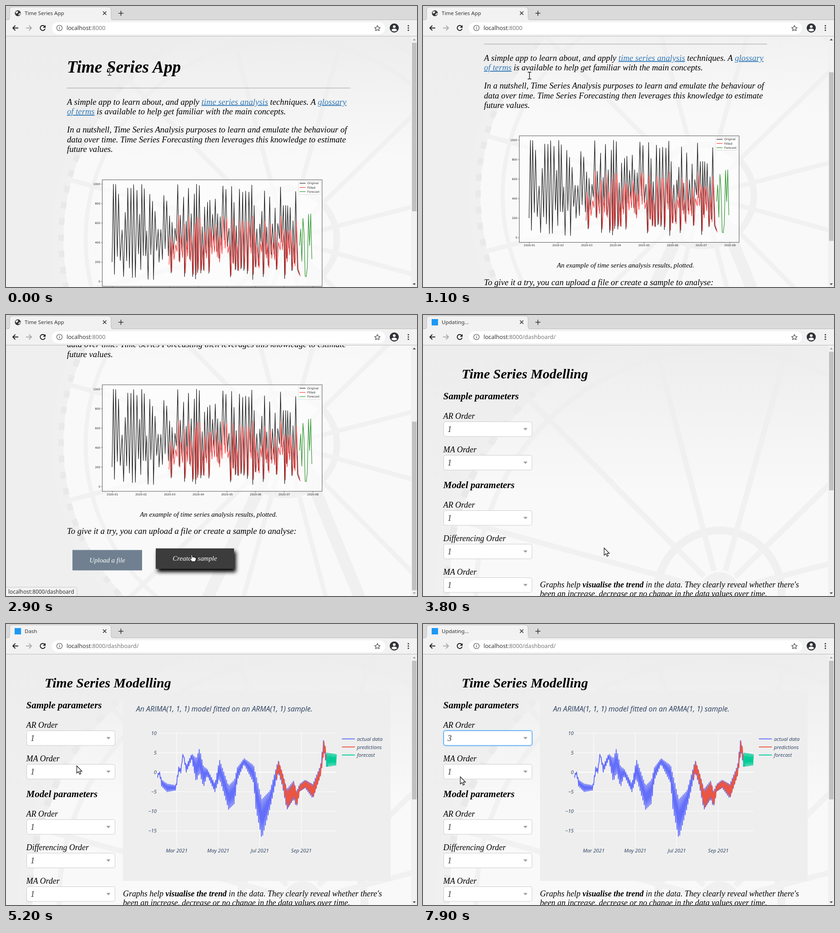
An HTML page that plays this animation: 903x620 px, repeating every 8000 ms.

```html
<!DOCTYPE html>
<html lang="en">
<head>
<meta charset="utf-8">
<title>Time Series App</title>
<style>
html, body { margin: 0; height: 100%; overflow: hidden; }
svg { display: block; width: 100vw; height: 100vh; font: italic 18.67px "Liberation Serif", serif; }
.ui { font-family: "Noto Sans", sans-serif; font-style: normal; fill: #333; }
.mpl { font-family: "DejaVu Sans", sans-serif; font-style: normal; fill: #222; }
.plotly { font-family: "Open Sans", sans-serif; fill: #2a3f5f; }
.b { font-weight: bold; }
.link { fill: #337ab7; text-decoration: underline; }
.line { fill: none; stroke-linejoin: round; }
</style>
</head>
<body>
<svg id="stage" viewBox="0 0 903 620"></svg>
<script>
const text = (x, y, size, str, attrs = '') => `<text x="${x}" y="${y}" font-size="${size}" ${attrs}>${str}</text>`;
const rect = (x, y, w, h, fill, attrs = '') => `<rect x="${x}" y="${y}" width="${w}" height="${h}" fill="${fill}" ${attrs}/>`;
const path = (d, stroke, width = 1, attrs = '') => `<path class="line" d="${d}" stroke="${stroke}" stroke-width="${width}" ${attrs}/>`;
const ring = (x, y, r, stroke, width, attrs = '') => `<circle cx="${x}" cy="${y}" r="${r}" fill="none" stroke="${stroke}" stroke-width="${width}" ${attrs}/>`;
const group = (id, body) => `<g id="${id}">${body}</g>`;
const poly = (points, stroke, width) => path('M' + points.map(p => p.map(n => n.toFixed(1)).join()).join('L'), stroke, width);
const clamp = v => Math.max(0, Math.min(1, v));

function seeded(seed) {
  return () => (seed = seed * 16807 % 2147483647) / 2147483647;
}

// Interpolates rows of [position, ...values]
function track(rows, at) {
  const next = rows.findIndex(r => r[0] > at);
  if (next === 0) return rows[0].slice(1);
  if (next < 0) return rows[rows.length - 1].slice(1);
  const a = rows[next - 1], b = rows[next], k = (at - a[0]) / (b[0] - a[0]);
  return a.slice(1).map((v, j) => v + (b[j + 1] - v) * k);
}

// Pale ferris wheel behind both pages
function backdrop() {
  const hub = [615, 515];
  let spokes = '';
  for (let i = 0; i < 12; i++) {
    const a = .27 + i * Math.PI / 6, c = Math.cos(a), s = Math.sin(a);
    spokes += `M${hub[0] + 40 * c},${hub[1] + 40 * s}L${hub[0] + 500 * c},${hub[1] + 500 * s}`;
  }
  return rect(-200, 67, 1300, 800, '#efefef') +
    '<circle cx="615" cy="515" r="510" fill="#f9f9f9"/>' +
    ring(...hub, 502, '#f0f0f0', 26) +
    ring(...hub, 494, '#e9e9e9', 12, 'stroke-dasharray="15 21"') +
    ring(...hub, 440, '#f1f1f1', 9) + ring(...hub, 112, '#f0f0f0', 14) +
    path(spokes, '#f1f1f1', 10) +
    path('M600 520L440 860M640 520L780 860', '#f0f0f0', 26) +
    '<circle cx="615" cy="515" r="36" fill="#f0f0f0"/>' +
    rect(-200, 67, 1300, 270, 'url(#haze)');
}

function sampleChart() {
  const random = seeded(77), y = v => 608 - .215 * v;
  const actual = [[233, 200]];
  for (let x = 236, high = true; x < 644; x += 2 + random() * 2, high = !high)
    actual.push([x, high ? 1000 - 480 * random() ** 1.3 : 20 + 420 * random() ** 1.2]);
  actual.push([645, 70]);
  const fitted = actual.filter(p => p[0] > 356).map(([x, v], i, all) =>
    [x + 1.5, .66 * v + .06 * (i ? all[i - 1][1] : 0)]);
  const forecast = [370, 540, 210, 650, 500, 55, 50, 150, 690, 370, 695, 230].map((v, i) => [645 + i * 2.45, v]);
  let out = rect(211.5, 383.5, 483, 235, '#fff', 'fill-opacity=".6" stroke="#555"');
  [[actual, '#222'], [fitted, '#f33'], [forecast, '#2e962e']].forEach(([data, color]) =>
    out += poly(data.map(([x, v]) => [x, y(v)]), color, 1.2));
  for (let v = 0; v <= 1000; v += 200)
    out += path(`M209 ${y(v)}h3`, '#444', .8) + text(207, y(v) + 2.3, 6, v, 'text-anchor="end"');
  for (let month = 1; month <= 8; month++) {
    const x = 171 + month * 62.9;
    out += path(`M${x} 618v3`, '#444', .8) + text(x, 627, 6, `2020-0${month}`, 'text-anchor="middle"');
  }
  out += rect(642.5, 386.5, 49, 29, '#fff', 'stroke="#ddd" rx="1"');
  [['Original', '#222'], ['Fitted', '#f33'], ['Forecast', '#2e962e']].forEach(([name, color], i) =>
    out += path(`M645 ${391 + i * 9.3}h13`, color, 1.2) + text(662, 393.3 + i * 9.3, 6.3, name));
  return `<g class="mpl">${out}</g>`;
}

const button = (id, x, w, label) => group(id,
  rect(x, 748, w, 45, '#708090') + text(x + w / 2, 775, 14.93, label, 'fill="#fff" text-anchor="middle"'));

const homePage = () => backdrop() +
  text(134, 147, 37.33, 'Time Series App', 'class="b"') + path('M134 181h622', '#999') +
  text(134, 217.5, 18.67, 'A simple app to learn about, and apply <tspan class="link">time series analysis</tspan> techniques. A <tspan class="link">glossary</tspan>') +
  text(134, 239, 18.67, '<tspan class="link">of terms</tspan> is available to help get familiar with the main concepts.') +
  ['In a nutshell, Time Series Analysis purposes to learn and emulate the behaviour of',
    'data over time. Time Series Forecasting then leverages this knowledge to estimate',
    'future values.'].map((s, i) => text(134, 279 + i * 21.5, 18.67, s)).join('') +
  sampleChart() +
  text(445, 674, 14.93, 'An example of time series analysis results, plotted.', 'text-anchor="middle"') +
  text(134, 712.5, 18.67, 'To give it a try, you can upload a file or create a sample to analyse:') +
  button('upload', 146, 153, 'Upload a file') + button('create', 329, 172, 'Create a sample');

const field = (label, y, id = 'f' + y) => text(44.5, y - 6.5, 17.92, label) +
  rect(45.5, y + .5, 194, 32.5, '#fff', `rx="4" stroke="#ccc" id="${id}Box"`) +
  text(54, y + 22.7, 17.92, 1, `fill="#333" id="${id}Value"`) +
  `<path d="M220.5 ${y + 14.5}h9l-4.5 5z" fill="#999" id="${id}Caret"/>`;

const signed = v => String(v).replace('-', '−');

function emptyPlot() {
  let out = rect(257, 147, 588, 420, '#fefefe');
  for (let v = -1; v <= 4; v++) {
    const y = 441.5 - v * 50.3;
    if (v > 0 && v < 4) out += path(`M332 ${y}h438`, '#eee');
    out += text(331, y + 4, 11.2, signed(v), 'text-anchor="end"');
  }
  for (let v = 0; v <= 6; v += 2) {
    const x = 394.5 + v * 62.7;
    if (v && v < 6) out += path(`M${x} 240v251`, '#eee');
    out += text(x, 504, 11.2, v, 'text-anchor="middle"');
  }
  return `<g class="plotly" style="fill:#444">${out}${path('M332 441.5h438.5M394.5 240v251', '#555', 1.1)}</g>`;
}

const modebar = () => rect(647, 158, 12, 9, '#f3f3f3', 'rx="1"') + ring(681, 161, 4.5, '#ccc', 2) +
  path('M684 165l4 4M679 161h4', '#ccc', 2) + path('M699 162h13M705.5 156v13', '#eee', 1.5) +
  rect(729, 157, 11, 11, '#f1f1f1') + rect(751, 157, 11, 11, '#f1f1f1') +
  path('M775 157l11 11M786 157l-11 11M796 163l6-6l6 6M799 162v6h6v-6', '#f0f0f0', 1.5) + rect(825, 155, 14, 14, '#ddd');

function modelPlot() {
  const y = v => 327 - 8.62 * v;
  // x, level, swing of the alternating days
  const shape = [[333, -1, .4], [337, 0, .3], [342, -2.8, .8], [354, -4, 1], [373, -4, .6], [380, 1, .7],
    [384, .2, .4], [389, 4.8, .2], [396, .8, .8], [408, 4, .7], [418, .5, 3], [425, 3, 3], [434, -1.2, 2.6],
    [442, 0, .8], [459, -4, 1], [469, .8, 2.4], [489, -6.5, 3], [502, -5, 3], [508, -.5, 1.6], [523, 2.8, .7],
    [544, -.5, 2.2], [549, -5, 4.3], [562, -12, 5], [580, -7, 2.2], [598, 1.5, 1.5], [607, -1.8, 1.6],
    [617, -7, 2.6], [632, -4.5, 2.3], [638, -7, 2], [645, -4, .9], [657, -3, 1], [674, -4.9, 1.8],
    [691, .5, 1.2], [698, 7, 1.6], [705, 2.4, 1]];
  const wave = (from, to, shift, scale) => {
    const points = [];
    for (let i = Math.round((from - 333) / 1.5); 333 + i * 1.5 <= to; i++) {
      const x = 333 + i * 1.5, [level, swing] = track(shape, x);
      points.push([x + shift, y(level + swing * scale * (i % 2 ? 1 : -1))]);
    }
    return points;
  };
  const forecast = Array.from({ length: 16 }, (_, i) => [704 + i * 1.45, y(3.2 + (i % 2 ? 1 : -1) * (1.75 - i * .025))]);
  let out = rect(257, 147, 588, 420, '#eee');
  for (let v = 10; v >= -15; v -= 5)
    out += path(`M333 ${y(v)}h393`, '#fff', v ? 1 : 2) + text(331, y(v) + 4, 11.2, signed(v), 'text-anchor="end"');
  ['Mar', 'May', 'Jul', 'Sep'].forEach((month, i) => {
    const x = 375 + i * 91.3;
    out += path(`M${x} 240v251`, '#fff') + text(x, 504, 11.2, month + ' 2021', 'text-anchor="middle"');
  });
  out += poly(wave(333, 705, 0, 1), '#636efa', 1.9) + poly(wave(593, 703, 1, .85), '#ef553b', 1.9) + poly(forecast, '#00cc96', 1.9);
  [['actual data', '#636efa'], ['predictions', '#ef553b'], ['forecast', '#00cc96']].forEach(([name, color], i) =>
    out += path(`M738 ${253.5 + i * 17.8}h28.5`, color, 1.9) + text(771, 257.7 + i * 17.8, 11.2, name));
  return `<g class="plotly">${out}${text(286, 193, 15.87, 'An ARIMA(1, 1, 1) model fitted on an ARMA(1, 1) sample.')}</g>`;
}

const dashboard = () => group('plots', group('empty', emptyPlot()) + group('modebar', modebar()) + group('model', modelPlot())) +
  text(85, 139.5, 29.87, 'Time Series Modelling', 'class="b"') +
  text(44.5, 186, 20.97, 'Sample parameters', 'class="b"') + field('AR Order', 235, 'order') + field('MA Order', 309) +
  text(44.5, 382, 20.97, 'Model parameters', 'class="b"') + field('AR Order', 431) +
  field('Differencing Order', 505) + field('MA Order', 579) +
  text(257, 600.5, 17.92, 'Graphs help <tspan class="b">visualise the trend</tspan> in the data. They clearly reveal whether there\'s') +
  text(257, 621, 17.92, 'been an increase, decrease or no change in the data values over time.') +
  group('menu', rect(45.5, 268.5, 195, 132, '#fff', 'stroke="#ccc" rx="2"') + rect(46, 269, 194, 32.5, '#e5f2ff', 'id="option"') +
    [1, 2, 3, 4].map((n, i) => text(53.5, 291 + i * 32.7, 17.92, n, i ? '' : 'class="b"')).join(''));

const browser = () => rect(0, 0, 903, 67, '#dadada') +
  '<path d="M0 31h4q4 0 4-4V9q0-7 7-7H224q7 0 7 7v18q0 4 4 4H903v35H0z" fill="#f2f2f2"/>' +
  path('M0 30.5h4q4 0 4-4V9q0-7 7-7H224q7 0 7 7v17.5q0 4 4 4H903M0 66.5H903', '#bbb') +
  rect(101, 36, 732, 26, '#fff', 'rx="13"') +
  group('globe', '<circle cx="26" cy="16" r="6.5" fill="#333"/><path d="M21 13l4-2 2 2-2 3-3 1zM27 18l4-3 1 2-4 4z" fill="#eee"/>') +
  rect(19, 9, 14, 14, '#1c98f5', 'id="favicon"') + path('M26 10a6 6 0 1 1-6 6', '#4285f4', 2, 'id="spinner"') +
  text(41, 20.3, 11.5, '', 'class="ui" id="title"') +
  path('M213 12l7.5 7.5M220.5 12l-7.5 7.5M247 16h11M252.5 10.5v11', '#333', 1.6) +
  path('M27 48.5H15M20.5 43l-5.5 5.5l5.5 5.5', '#222', 1.8) + path('M44 48.5h12M50.5 43l5.5 5.5l-5.5 5.5', '#aaa', 1.8) +
  path('M85 45a5.5 5.5 0 1 0 1 5', '#222', 1.9) + '<path d="M87 42v6h-6z" fill="#222"/>' +
  ring(117.5, 48.5, 6, '#555', 1.2) + path('M117.5 47.5v4M117.5 45v1.3', '#555', 1.3) +
  text(133, 53, 12.6, 'localhost<tspan fill="#777">:8000<tspan id="route"></tspan></tspan>', 'class="ui"') +
  path('M816 43l2 4 4 .5-3 3 1 4-4-2-4 2 1-4-3-3 4-.5z', '#444', 1.2) +
  '<circle cx="853" cy="48.5" r="10" fill="#303236"/><circle cx="853" cy="45.5" r="3" fill="#fff"/><path d="M847 54q0-4 6-4t6 4q-6 4-12 0z" fill="#fff"/>' +
  [43.5, 48.5, 53.5].map(y => `<circle cx="884" cy="${y}" r="1.6" fill="#333"/>`).join('');

const scrollbar = () => rect(890, 67, 13, 553, '#f1f1f1') + rect(892, 81, 10, 372, '#c1c1c1', 'id="thumb"') +
  '<path id="up" d="M893.5 76h7l-3.5-4z"/><path id="down" d="M893.5 612h7l-3.5 4z"/>';

function pointers() {
  const beam = 'M-4-7h3l1 1 1-1h3M0-6V7M-4 8h3l1-1 1 1h3';
  return group('arrow', '<path d="M0 0V16l3.7-3.3 2.5 5.8 2.7-1.1-2.5-5.6h5z" fill="#fff" stroke="#111" stroke-width="1.2"/>') +
    group('beam', path(beam, '#fff', 3) + path(beam, '#111', 1.4)) +
    group('hand', '<path d="M-2 1.5q1-2 2.5 0V6q4-.5 8 2v4l-2 4H-.5l-5-6q1-2 3.5 0z" fill="#fff" stroke="#111" stroke-width="1.1"/>');
}

document.getElementById('stage').innerHTML =
  '<defs><linearGradient id="haze" x2="0" y2="1"><stop stop-color="#ededed"/><stop offset="1" stop-color="#ededed" stop-opacity="0"/></linearGradient></defs>' +
  group('home', homePage()) +
  group('dash', `<g transform="translate(-95.7 -14.4) scale(1.215)">${backdrop()}</g>` + group('content', dashboard())) +
  group('scrollbar', scrollbar()) + browser() +
  group('status', '<path d="M-1 621V600.5H151q5 0 5 5V621z" fill="#f2f2f2" stroke="#c8c8c8"/>' + text(5, 615, 11.85, 'localhost:8000/dashboard', 'class="ui"')) +
  group('cursor', pointers());

const scrollKeys = [[800, 0], [900, 18], [1100, 97], [1200, 107], [1300, 107], [1600, 175.5], [1900, 229.5]];
const cursorKeys = [[300, 227.5, 145], [500, 234, 153], [1300, 234, 153], [1600, 242, 178], [1800, 258, 215],
  [2200, 400, 535], [2400, 409, 528], [3300, 409, 528], [3700, 398, 514], [4600, 398, 514], [5000, 230, 370],
  [5400, 81, 256], [6500, 81, 256], [7000, 220, 362], [7700, 220, 362], [7900, 82, 337]];

const el = id => document.getElementById(id);
const set = (id, name, value) => el(id).setAttribute(name, value);
const show = (id, on) => el(id).style.display = on ? '' : 'none';

function render(t) {
  const home = t < 3300, ready = t >= 3800, open = t >= 6500 && t < 7400, chosen = t >= 7400;
  const [scroll] = track(scrollKeys, t), [x, y] = track(cursorKeys, t);

  show('home', home);
  show('dash', !home);
  show('content', ready);
  set('home', 'transform', `translate(0 ${-scroll})`);

  const hover = clamp((t - 2200) / 200), mix = (a, b) => Math.round(a + (b - a) * hover);
  const face = el('create').firstChild;
  set('create', 'transform', `translate(0 ${-3.5 * hover})`);
  face.setAttribute('fill', `rgb(${mix(112, 60)},${mix(128, 60)},${mix(144, 60)})`);
  face.style.filter = hover ? `drop-shadow(4px 7px 4px rgba(0,0,0,${hover}))` : '';
  show('status', t >= 2300 && home);

  show('plots', t >= 4000);
  show('empty', t < 4800);
  show('modebar', t >= 4600 && t < 4800);
  show('model', t >= 4800);
  show('menu', open);
  set('option', 'y', 269 + 32.7 * Math.max(0, Math.min(3, Math.floor((y - 268) / 32.7))));
  set('orderCaret', 'd', open ? 'M220.5 255.5h9l-4.5-5z' : 'M220.5 249.5h9l-4.5 5z');
  set('orderBox', 'stroke', chosen ? '#1f8cff' : '#ccc');
  el('orderBox').style.filter = chosen ? 'drop-shadow(0 0 1.5px rgba(0,126,255,.5))' : '';
  el('orderValue').textContent = chosen ? 3 : 1;

  show('globe', t < 3000);
  show('favicon', ready);
  show('spinner', t >= 3000 && !ready);
  set('spinner', 'transform', `rotate(${t * .6} 26 16)`);
  el('title').textContent = home ? 'Time Series App' : (ready && t < 5000) || t >= 7600 ? 'Updating...' : 'Dash';
  el('route').textContent = home ? '' : '/dashboard/';

  show('scrollbar', home || ready);
  set('thumb', 'y', home ? 81 + scroll * .6725 : 81);
  set('thumb', 'height', home ? 372 : 306);
  set('up', 'fill', home && scroll ? '#505050' : '#a3a3a3');
  set('down', 'fill', home && scroll > 229 ? '#a3a3a3' : '#505050');

  const kind = t < 1400 ? 'beam' : t >= 2200 && home ? 'hand' : 'arrow';
  ['arrow', 'beam', 'hand'].forEach(id => show(id, id === kind));
  set('cursor', 'transform', `translate(${x} ${y})`);
}

function tick() {
  render(Math.floor(performance.now() % 8000 / 100) * 100);
  requestAnimationFrame(tick);
}
tick();
</script>
</body>
</html>
```
